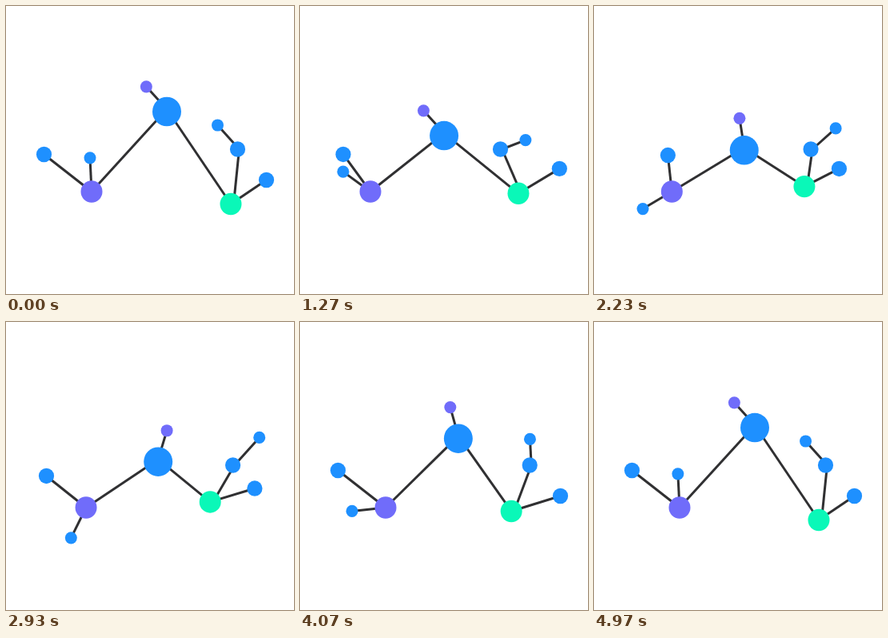
An HTML page that plays this animation: 360x360 px, repeating every 5.01 s.

```html
<!DOCTYPE html>
<html lang="en">
<head>
<meta charset="utf-8">
<title>Node network</title>
<style>
  html, body { margin: 0; width: 100%; height: 100%; overflow: hidden; background: #fff; }
  svg { display: block; width: 100%; height: 100%; }
</style>
</head>
<body>
<svg id="stage" viewBox="0 0 360 360"></svg>
<script>
const LOOP_MS = 5010, FRAMES = 150;
const BLUE = '#1e90ff', PURPLE = '#706cfa', GREEN = '#0af8b8', LINE = '#303032';
const stage = document.getElementById('stage');

function setAttrs(el, attrs) {
  for (const name in attrs) el.setAttribute(name, attrs[name]);
}

function add(tag, attrs) {
  const el = document.createElementNS('http://www.w3.org/2000/svg', tag);
  setAttrs(el, attrs);
  return stage.appendChild(el);
}

// Eased progress from 0 to 1 between two frames.
function ease(frame, from, to) {
  const s = Math.min(1, Math.max(0, (frame - from) / (to - from)));
  return s * s * (3 - 2 * s);
}

// A closed trip from home through stops [frame, x, y], on a smooth curve.
// Each leg is eased along its own length.
function route(home, stops, start = 0, end = FRAMES) {
  const keys = [[start, ...home], ...stops, [end, ...home]];
  const handle = (i, axis) =>
    i > 0 && i < keys.length - 1 ? (keys[i + 1][axis] - keys[i - 1][axis]) / 6 : 0;
  const legs = keys.slice(1).map((to, i) => {
    const from = keys[i];
    const out = [1, 2].map(axis => from[axis] + handle(i, axis));
    const into = [1, 2].map(axis => to[axis] - handle(i + 1, axis));
    const curve = add('path', {
      fill: 'none', d: `M${from.slice(1)} C${out} ${into} ${to.slice(1)}`
    });
    return { from: from[0], to: to[0], curve, length: curve.getTotalLength() };
  });
  return frame => {
    const leg = legs.find(l => frame < l.to) || legs[legs.length - 1];
    return leg.curve.getPointAtLength(leg.length * ease(frame, leg.from, leg.to));
  };
}

// Turns from one angle to another and back; degrees anticlockwise from straight up.
function orbit(center, radius, rest, far, start, peak) {
  return (frame, at) => {
    const share = ease(frame, start, peak) - ease(frame, peak, FRAMES);
    const angle = (rest + (far - rest) * share) * Math.PI / 180;
    return shift(at[center], -radius * Math.sin(angle), -radius * Math.cos(angle));
  };
}

function shift(point, dx, dy) {
  return { x: point.x + dx, y: point.y + dy };
}

const motions = {
  hub: route([201, 132], [[30, 180.5, 159.5], [70, 188, 180]]),
  left: route([107, 232], [[30, 87.3, 232], [70, 97.5, 232]], 0, 120),
  right: route([281, 247.5], [[30, 274, 235.5], [70, 262.7, 225.5], [100, 253, 228]]),
  leftLeaf: route([47.5, 185.5], [[64, 93.9, 186], [90, 48.8, 192.5]], 30, 120),
  rightLeaf: route([325.5, 217.5], [[30, 326.3, 204.2], [70, 306.3, 203.7]], 0, 120),
  upper: route([289.5, 179], [[30, 248.7, 179], [70, 271.4, 179], [90, 284.4, 179]]),
  tip: route([264.5, 149], [[30, 279, 168], [70, 302.5, 152.7], [90, 315.6, 144.2]]),
  hubLeaf: orbit('hub', 40.4, 39.4, -16.2, 40, 90),
  leftOrbit: orbit('left', 42.2, 2.7, 161, 0, 100),
  // Points where lines attach off centre
  hubJoint: (frame, at) => shift(at.hub, 0, -3),
  rightJoint: (frame, at) => shift(at.right, 3.5, 0),
  upperJoint: (frame, at) => shift(at.upper, 2, 0)
};

const links = [['hubJoint', 'left'], ['hubJoint', 'right'], ['hubJoint', 'hubLeaf'],
  ['left', 'leftLeaf'], ['left', 'leftOrbit'], ['rightJoint', 'upperJoint'],
  ['right', 'rightLeaf'], ['upperJoint', 'tip']];
const lines = links.map(() => add('line', { stroke: LINE, 'stroke-width': 3 }));

const BIG = 18, MEDIUM = 13.5, SMALL = 9.6, TINY = 7.5;
const dot = (r, fill) => add('ellipse', { rx: r, ry: r * 1.015, fill });
const dots = {
  hub: dot(BIG, BLUE), hubLeaf: dot(TINY, PURPLE),
  left: dot(MEDIUM, PURPLE), leftLeaf: dot(SMALL, BLUE), leftOrbit: dot(TINY, BLUE),
  right: dot(MEDIUM, GREEN), rightLeaf: dot(SMALL, BLUE),
  upper: dot(SMALL, BLUE), tip: dot(TINY, BLUE)
};

function draw(ms) {
  const frame = Math.min(FRAMES - 1, Math.floor((ms % LOOP_MS + 8) / (LOOP_MS / FRAMES)));
  const at = {};
  for (const name in motions) at[name] = motions[name](frame, at);
  links.forEach(([from, to], i) => setAttrs(lines[i], {
    x1: at[from].x, y1: at[from].y, x2: at[to].x, y2: at[to].y
  }));
  for (const name in dots) setAttrs(dots[name], { cx: at[name].x, cy: at[name].y });
}

const start = performance.now();
function tick() {
  draw(performance.now() - start);
  requestAnimationFrame(tick);
}
tick();
</script>
</body>
</html>
```
